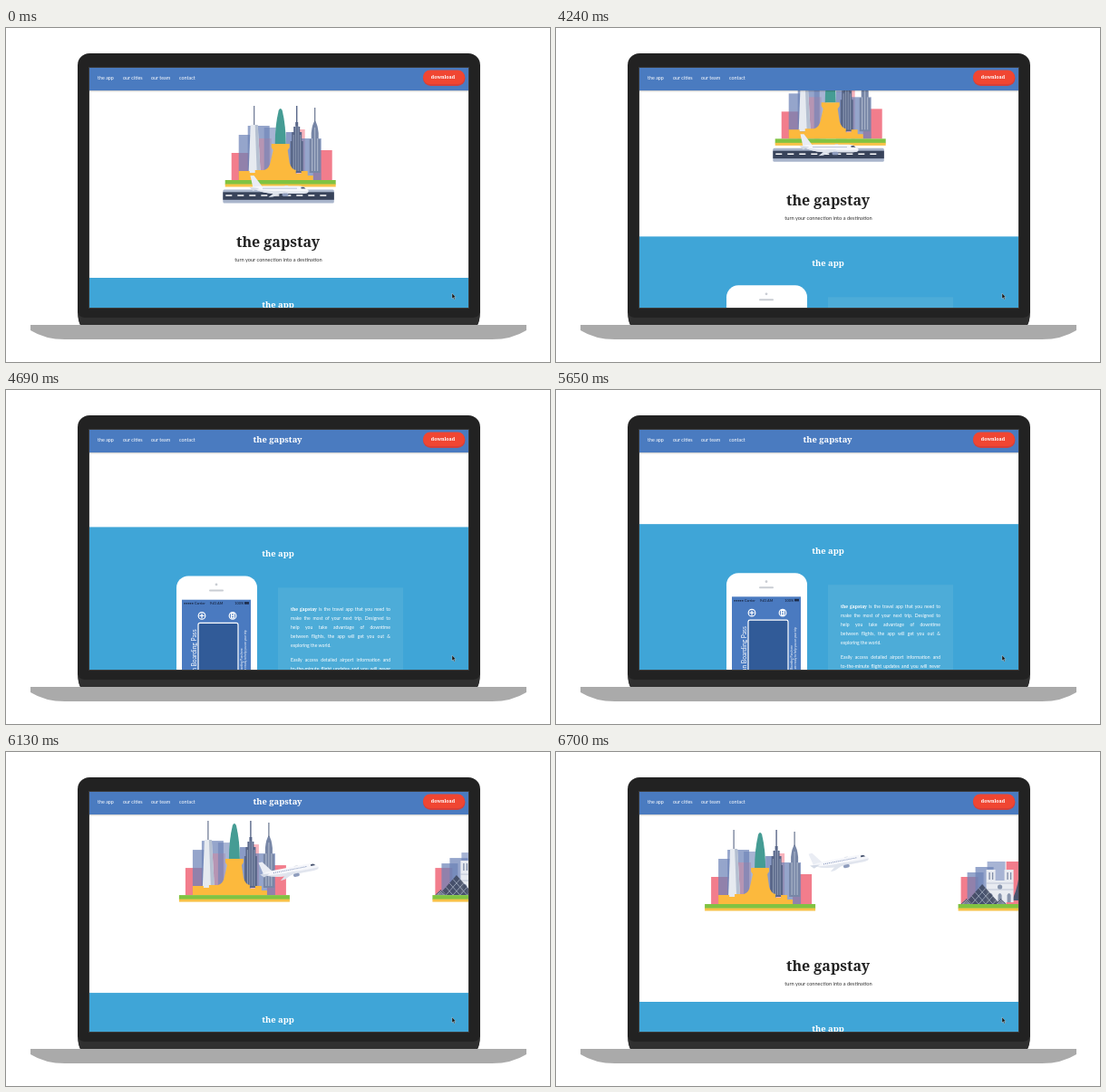
An HTML page for the animation above (6730 ms loop, 600 by 369 pixels).

```html
<!DOCTYPE html>
<html lang="en">
<head>
<meta charset="utf-8">
<title>the gapstay</title>
<style>
html, body { margin: 0; width: 100%; height: 100%; overflow: hidden; background: #fff; }
svg { display: block; width: 100vw; height: 100vh; }
text, .copy { font-family: Lato, "Open Sans", sans-serif; }
.slab { font-family: "Noto Serif", serif; font-weight: 700; }
.copy { color: #fff; font-size: 5.1px; line-height: 10.1px; }
.copy div { height: 10.1px; text-align: justify; text-align-last: justify; white-space: nowrap; }
.copy .slab { font-size: 4.9px; line-height: 1; }
.copy .end { text-align-last: left; margin-bottom: 5.5px; }
</style>
</head>
<body>
<svg viewBox="0 0 600 369">
  <defs>
    <clipPath id="screen"><rect x="92" y="44" width="418" height="265"/></clipPath>
    <clipPath id="phoneScreen"><rect x="194" y="356" width="76" height="140"/></clipPath>
    <linearGradient id="shade" x2="0" y2="1">
      <stop offset="0" stop-opacity=".22"/><stop offset="1" stop-opacity="0"/>
    </linearGradient>
  </defs>

  <path d="M79 314V41A13 13 0 0 1 92 28H510A13 13 0 0 1 523 41V314Q522.500 324 520 328H82Q79.500 324 79 314Z" fill="#222"/>
  <path d="M79.500 316Q82 320 88 320H514Q520 320 522.500 316Q522 324 520 328H82Q80 324 79.500 316Z" fill="#303030"/>
  <path d="M27 328H574V334Q558 344 536 344H65Q43 344 27 334Z" fill="#aaa"/>
  <rect x="91" y="43" width="420" height="267" fill="#3a3a3a"/>

  <g clip-path="url(#screen)">
    <rect x="92" y="44" width="418" height="265" fill="#fff"/>
    <g id="page">
      <g id="road">
        <rect x="0" y="178.500" width="122.500" height="15" rx="1.500" fill="#a9b5cb"/>
        <rect x="0" y="181.300" width="122.500" height="8.500" fill="#38435a"/>
        <path d="M3 185H120" stroke="#fff" stroke-width="1.500" stroke-dasharray="7 6"/>
      </g>
      <g id="newYork"></g>
      <g id="paris"></g>
      <g id="plane">
        <path d="M-5 0L6 -5L9 -5L5 1Z" fill="#c5cddb"/>
        <path d="M-33 -16H-29L-20 -4L-30 -2Z" fill="#eaedf4"/>
        <path d="M-32 -3Q-26 -4.500 -18 -4.500H20Q27 -4.500 31 .5Q32 3.500 25 4H-8Q-22 3 -32 -3Z" fill="#f6f7fb"/>
        <path d="M-28 -1Q-12 2 31 1.500Q31 4 25 4H-8Q-20 3 -28 -1Z" fill="#e1e5ee"/>
        <path d="M-19 -1.800H18" stroke="#7f90b8" stroke-width="1" stroke-dasharray="1 1"/>
        <path d="M23 -3.300H26L28 -1.500H23Z" fill="#46526d"/>
        <path d="M-34 -3L-23 -2L-30 1Z" fill="#d3dae6"/>
        <rect x="2" y="3.500" width="7" height="3.500" rx="1.700" fill="#8f9dbd"/>
        <path d="M-4 1H7L-8 7.500L-13 8Z" fill="#dfe4ed"/>
      </g>
      <g id="heading" text-anchor="middle">
        <text class="slab" x="300" y="242" font-size="16" fill="#222">the gapstay</text>
        <text x="300.500" y="257.500" font-size="5.650" fill="#333">turn your connection into a destination</text>
      </g>
      <rect x="92" y="276" width="418" height="260" fill="#3fa5d7"/>
      <text class="slab" x="300" y="309" font-size="9.400" fill="#fff" text-anchor="middle">the app</text>

      <rect x="188" y="330" width="89" height="190" rx="13" fill="#fff"/>
      <circle cx="232" cy="339.500" r="1.400" fill="#c9cdd3"/>
      <rect x="224" y="345" width="16" height="2" rx="1" fill="#c9cdd3"/>
      <g clip-path="url(#phoneScreen)">
        <rect x="194" y="356" width="76" height="140" fill="#4a7ac0"/>
        <g font-size="3.800" font-weight="700" fill="#1d2c4a">
          <text x="196" y="361.500">••••• Carrier</text>
          <text x="232" y="361.500" text-anchor="middle">9:41 AM</text>
          <text x="262" y="361.500" text-anchor="end">100%</text>
          <rect x="263" y="358.700" width="5" height="2.600"/>
        </g>
        <g fill="none" stroke="#fff" stroke-width="1.200">
          <circle cx="216" cy="374" r="3.800"/><path d="M213.500 374H218.500M216 371.500V376.500"/>
          <circle cx="250" cy="374" r="3.800"/><path d="M248.500 371.500H251.500V376.500H248.500ZM248.500 374H251.500"/>
          <rect x="212" y="382" width="44" height="95" rx="2" fill="#315b98"/>
        </g>
        <g fill="#fff" text-anchor="end">
          <text transform="translate(209.500 389) rotate(-90)" font-size="6.700">Scan Boarding Pass</text>
          <text transform="translate(260.700 410) rotate(-90)" font-size="3.200">your Boarding Pass here</text>
          <text transform="translate(265 390) rotate(-90)" font-size="3.200">and we are ready to help you on your trip</text>
        </g>
      </g>

      <rect x="300" y="343" width="138" height="150" fill="#4dacd8"/>
      <foreignObject x="314" y="362" width="110" height="120">
        <div class="copy" xmlns="http://www.w3.org/1999/xhtml">
          <div><span class="slab">the gapstay</span> is the travel app that you need to</div>
          <div>make the most of your next trip. Designed to</div>
          <div>help you take advantage of downtime</div>
          <div>between flights, the app will get you out &amp;</div>
          <div class="end">exploring the world.</div>
          <div>Easily access detailed airport information and</div>
          <div>to-the-minute flight updates and you will never</div>
          <div>have to worry about missing a connection</div>
          <div class="end">while you explore.</div>
        </div>
      </foreignObject>
    </g>

    <rect x="92" y="69" width="418" height="2" fill="url(#shade)"/>
    <rect x="92" y="44" width="418" height="25" fill="#4a7bc0"/>
    <g font-size="5.400" fill="#fff">
      <text x="101" y="57.300">the app</text><text x="129" y="57.300">our cities</text>
      <text x="160" y="57.300">our team</text><text x="191" y="57.300">contact</text>
    </g>
    <text id="navTitle" class="slab" x="299.500" y="57.800" font-size="9.400" fill="#fff" text-anchor="middle">the gapstay</text>
    <rect x="460" y="47" width="46.500" height="17" rx="8.500" fill="#d63f38"/>
    <rect x="460" y="46.500" width="46" height="15.500" rx="7.700" fill="#f04632"/>
    <text class="slab" x="482" y="56.200" font-size="5.300" fill="#fff" text-anchor="middle">download</text>
    <path d="M492 293V299L493.400 297.800L494.400 300L495.300 299.500L494.300 297.500H496Z" fill="#111" stroke="#ddd" stroke-width=".4"/>
  </g>
</svg>

<script>
const LOOP = 6730;
const $ = id => document.getElementById(id);
const clamp = v => Math.max(0, Math.min(1, v));
const ramp = (t, from, to) => clamp((t - from) / (to - from));

const box = (x, y, w, fill, opacity = 1) =>
  `<rect x="${x}" y="${y}" width="${w}" height="${168 - y}" fill="${fill}" opacity="${opacity}"/>`;
const shape = (d, fill, opacity = 1) => `<path d="${d}" fill="${fill}" opacity="${opacity}"/>`;
const line = (d, color, width) => `<path d="${d}" fill="none" stroke="${color}" stroke-width="${width}"/>`;

const PINK = '#f27686', BLUE = '#6d83b8';
const ground = `<rect y="168" width="122" height="5" fill="#80c342"/>
  <rect y="172.500" width="122" height="3" fill="#f8c248"/>`;

$('newYork').innerHTML = [
  box(7, 138, 20, PINK, .95), box(97, 135, 21, PINK, .95),
  box(15, 118, 18, BLUE, .72), box(25, 108, 24, BLUE, .72), box(37, 122, 14, PINK, .35),
  box(43, 110, 13, BLUE, .6), box(67, 115, 12, BLUE, .8), box(79, 112, 9, PINK, .55),
  box(84, 122, 22, BLUE, .72),
  shape('M26 158L28 107H36L39 160H26Z', '#e6eaf0'),
  shape('M33 107H36L39 160H35Z', '#b5c0d1'),
  line('M32 86V107', '#66738f', 1.2),
  shape('M72 160V125H73.500V115H75.500V109H77.500V104H80.500V109H82.500V115H84.500V125H86V160Z', '#596789'),
  line('M79 86V105', '#596789', 1.4),
  line('M75.500 118V158M78 108V158M80.500 108V158M83 118V158', '#aab5cb', .7),
  shape('M93 160V123H95V116Q96 106 99 102Q102 106 103 116V123H105V160Z', '#7786a6'),
  line('M99 88V104', '#68758f', 1.2),
  line('M96 122V158M99 110V158M102 122V158', '#c3cbda', .8),
  shape('M15 168V158H27V160H33V157H43Q49 155 50 148L53 135L51 132V128H71V132L69 135L71 149' +
    'Q73 156 78 157V161H84V158H91V163H97V168Z', '#fcb93d'),
  shape('M55 128Q55 108 59 91Q61 87 63 91Q67 108 67 128Z', '#459c94'),
  ground
].join('');

const pyramid = (x, w, h) => {
  const at = (u, v) => `${x + w * u} ${168 - h * v}`;
  const lattice = [.2, .4, .6, .8].map(u =>
    `M${at(u, 0)}L${at((1 + u) / 2, 1 - u)}M${at(u, 0)}L${at(u / 2, u)}`).join('');
  return shape(`M${at(0, 0)}L${at(.5, 1)}L${at(1, 0)}Z`, '#3e475e', .85) + line(lattice, '#b4bdce', .7);
};

$('paris').innerHTML = [
  box(3, 138, 19, PINK, .95), box(10, 133, 18, BLUE, .72), box(19, 127, 20, BLUE, .72),
  box(32, 121, 20, BLUE, .6), box(53, 121, 40, PINK, .95), box(84, 130, 24, BLUE, .7),
  shape('M59 164Q67 150 68 123H73V164Z', '#4d566f'),
  shape('M31 166V130H41V142H51V130H61V166Z', '#e8ebf1'),
  line('M34.500 133V141M38 133V141M54.500 133V141M58 133V141', '#8390aa', 1.4),
  line('M31 145H61M31 152H61', '#b3bccd', .8),
  '<circle cx="46" cy="149" r="2.600" fill="#8794ad"/>',
  shape('M34 166V158Q36 154 38 158V166ZM44 166V158Q46 154 48 158V166ZM54 166V158Q56 154 58 158V166Z', '#8794ad'),
  pyramid(7, 39, 22), pyramid(3, 12, 6), pyramid(41, 12, 6), ground
].join('');

// Scroll distance: smooth monotone curve through a few points.
const SCROLL = [[4000, 0], [4030, 2], [4390, 80], [4690, 124.5], [5150, 152], [5400, 153],
  [5650, 128], [6130, 10], [6320, 0]];
const slope = i => (SCROLL[i + 1][1] - SCROLL[i][1]) / (SCROLL[i + 1][0] - SCROLL[i][0]);
const tangent = i => {
  if (i === 0 || i === SCROLL.length - 1) return 0;
  const a = slope(i - 1), b = slope(i);
  return a * b <= 0 ? 0 : 2 * a * b / (a + b);
};
function scrollAt(t) {
  const i = SCROLL.findIndex((p, n) => n < SCROLL.length - 1 && t >= p[0] && t < SCROLL[n + 1][0]);
  if (i < 0) return 0;
  const [t0, y0] = SCROLL[i], [t1, y1] = SCROLL[i + 1];
  const h = t1 - t0, u = (t - t0) / h, v = 1 - u;
  return y0 * (1 + 2 * u) * v * v + tangent(i) * h * u * v * v +
    y1 * u * u * (3 - 2 * u) - tangent(i + 1) * h * u * u * v;
}

const move = (id, x, y, turn = 0) =>
  $(id).setAttribute('transform', `translate(${x} ${y}) rotate(${turn})`);

function draw(t) {
  const flown = Math.max(0, t - 5050);
  const lift = clamp(flown / 1000);
  const cityX = 241.7 - flown * .047;
  const docked = ramp(t, 4420, 4640) * (1 - ramp(t, 6200, 6450));

  move('page', 0, -scrollAt(t));
  move('newYork', cityX, 0);
  move('paris', cityX + 279.5, 0);
  move('road', 239.3 - 200 * ramp(t, 5100, 5800), 0);
  $('road').setAttribute('opacity', 1 - ramp(t, 5300, 5800));
  move('plane', 302.5 + 11.5 * lift, 179 - flown * .0345, -11 * lift);
  $('heading').setAttribute('opacity', 1 - docked);
  $('navTitle').setAttribute('opacity', docked);
}

const begin = performance.now();
function tick() {
  draw((performance.now() - begin) % LOOP);
  requestAnimationFrame(tick);
}
tick();
</script>
</body>
</html>
```
